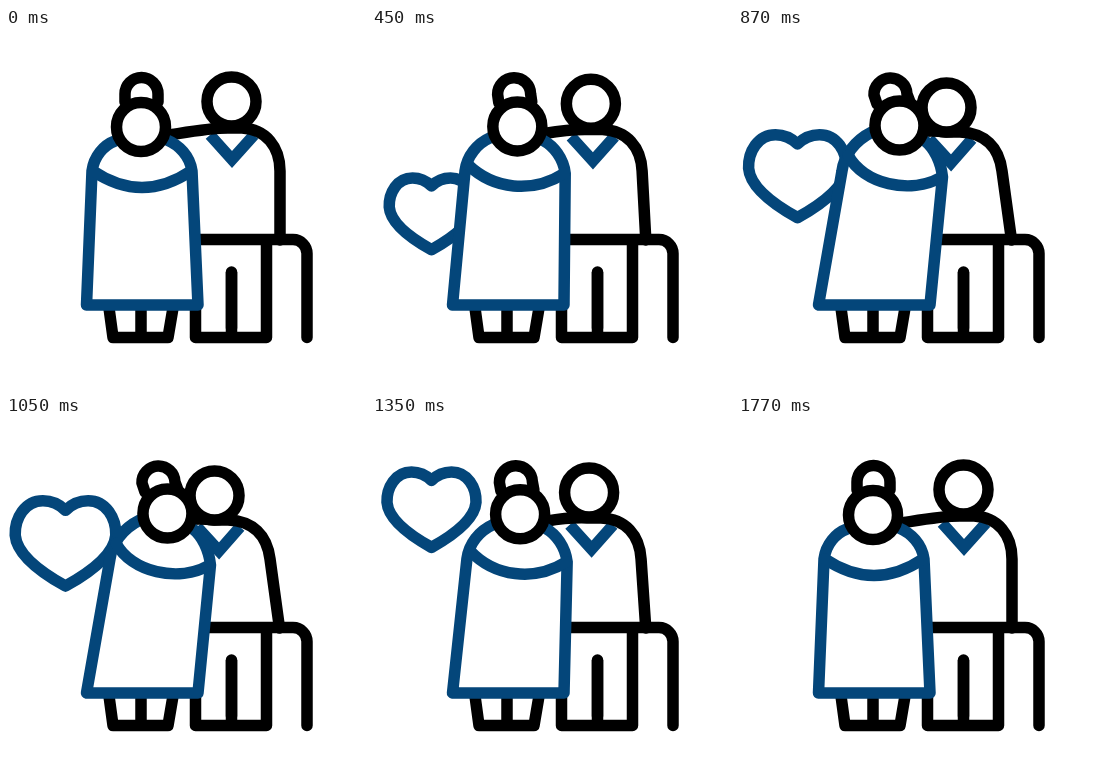
These frames come from a looping animation (360x360 px, 1800 ms). An HTML page:

```html
<!DOCTYPE html>
<html lang="en">
<head>
<meta charset="utf-8">
<title>Couple with a heart</title>
<style>
  html, body { margin: 0; width: 100%; height: 100%; overflow: hidden; background: #fff; }
  svg { display: block; width: 100vw; height: 100vh; }
  path { fill: none; stroke: #000; stroke-width: 11.5; stroke-linecap: round; stroke-linejoin: round; }
  .blue { stroke: #04467a; }
  .flat { stroke-linecap: butt; }
  .miter { stroke-linejoin: miter; }
  .solid { fill: #fff; }
</style>
</head>
<body>
<svg viewBox="0 0 360 360">
  <path id="heart" class="blue"/>
  <path id="collar" class="blue flat miter"/>
  <path id="torso"/>
  <path id="manHead" class="solid"/>
  <path d="M192 211.600H287A14 14 0 0 1 301 225.600V309.5"/>
  <path class="flat" d="M189.5 280V309.5H260.5V212M225.5 309V244"/>
  <path d="M225.5 300V244"/>
  <path class="flat" d="M103 280L107 309.5H162L167 280M135 280V309"/>
  <path id="dress" class="blue solid"/>
  <path id="neckline" class="blue"/>
  <path id="bun"/>
  <path id="womanHead" class="solid"/>
</svg>
<script>
const LOOP = 1800;
const $ = id => document.getElementById(id);
const ring = (x, y, r = 24.5) =>
  `M${x - r} ${y}A${r} ${r} 0 0 1 ${x + r} ${y}A${r} ${r} 0 0 1 ${x - r} ${y}Z`;

// Each part: upright pose, leaning pose
const poses = {
  collar: ['M204 107L226 131.5L248 107', 'M191 111L213 135L234 111'],
  torso: ['M166 106.5C188 103 205 100 222 100L236 100C260 101 274 119 274 143L274 212',
          'M182 104C192 102 200 103 208 104L222 104C247 105 261 119 264 143L273.5 212'],
  manHead: [ring(225.5, 73.5), ring(208.5, 79.5)],
  dress: ['M109 113C98 117 88 128 86 143L80.5 277L192 277L186 143C184 128 173 117 161 112',
          'M134 104C116 113 106 128 104 143L80.5 277L192 277L204.5 149C203 134 196 120 187 113'],
  neckline: ['M87 143C119.7 165 152.3 165 185 143', 'M110 127C125 156 172 167 204 149'],
  bun: ['M119 74L119 66A16.5 16.5 0 0 1 152 66L152 74',
        'M139 76L136 67A16.5 16.5 0 0 1 169 66L172 74'],
  womanHead: [ring(135, 99), ring(161.5, 97.5)]
};

const mix = (a, b, k) => a + (b - a) * k;
const smooth = p => p * p * (3 - 2 * p);
const quart = p => p < .5 ? 8 * p ** 4 : 1 - 8 * (1 - p) ** 4;
const clamp = p => Math.min(1, Math.max(0, p));

function mixPath([a, b], k) {
  const ends = b.match(/-?[\d.]+/g);
  let i = 0;
  return a.replace(/-?[\d.]+/g, n => mix(+n, +ends[i++], k));
}

function keyed(keys, t, ease = p => p) {
  const i = keys.findIndex(([time]) => t < time);
  if (i < 0) return keys[keys.length - 1][1];
  if (!i) return keys[0][1];
  const [t0, v0] = keys[i - 1], [t1, v1] = keys[i];
  return mix(v0, v1, ease((t - t0) / (t1 - t0)));
}

const beat = [[330, 0], [470, 1], [600, .76], [930, 1.13], [1100, 1.13],
              [1220, 1], [1490, 1], [1650, 0]];
const rise = [[330, 195], [600, 174], [870, 148], [1230, 106.5], [1470, 80.5]];

function heartPath(s, y) {
  const outline = 'M0 -29C-6 -35 -13 -37.5 -20 -37.5C-36 -37.5 -45 -22 -44.5 -7' +
    'C-43 12 -18 28 0 38C18 28 43 12 44.5 -7C45 -22 36 -37.5 20 -37.5C13 -37.5 6 -35 0 -29Z';
  let i = 0;
  return outline.replace(/-?[\d.]+/g, n => n * s + (i++ % 2 ? y : 59.5) + ' ');
}

function draw(now) {
  const t = now % LOOP;
  const lean = t < 960 ? quart(t / 960) : 1 - quart(clamp((t - 960) / 780));
  for (const id in poses) $(id).setAttribute('d', mixPath(poses[id], lean));
  const size = keyed(beat, t, smooth);
  $('heart').setAttribute('d', size > .01 ? heartPath(size, keyed(rise, t)) : '');
}

const start = performance.now();
function tick() {
  draw(performance.now() - start);
  requestAnimationFrame(tick);
}
tick();
</script>
</body>
</html>
```
